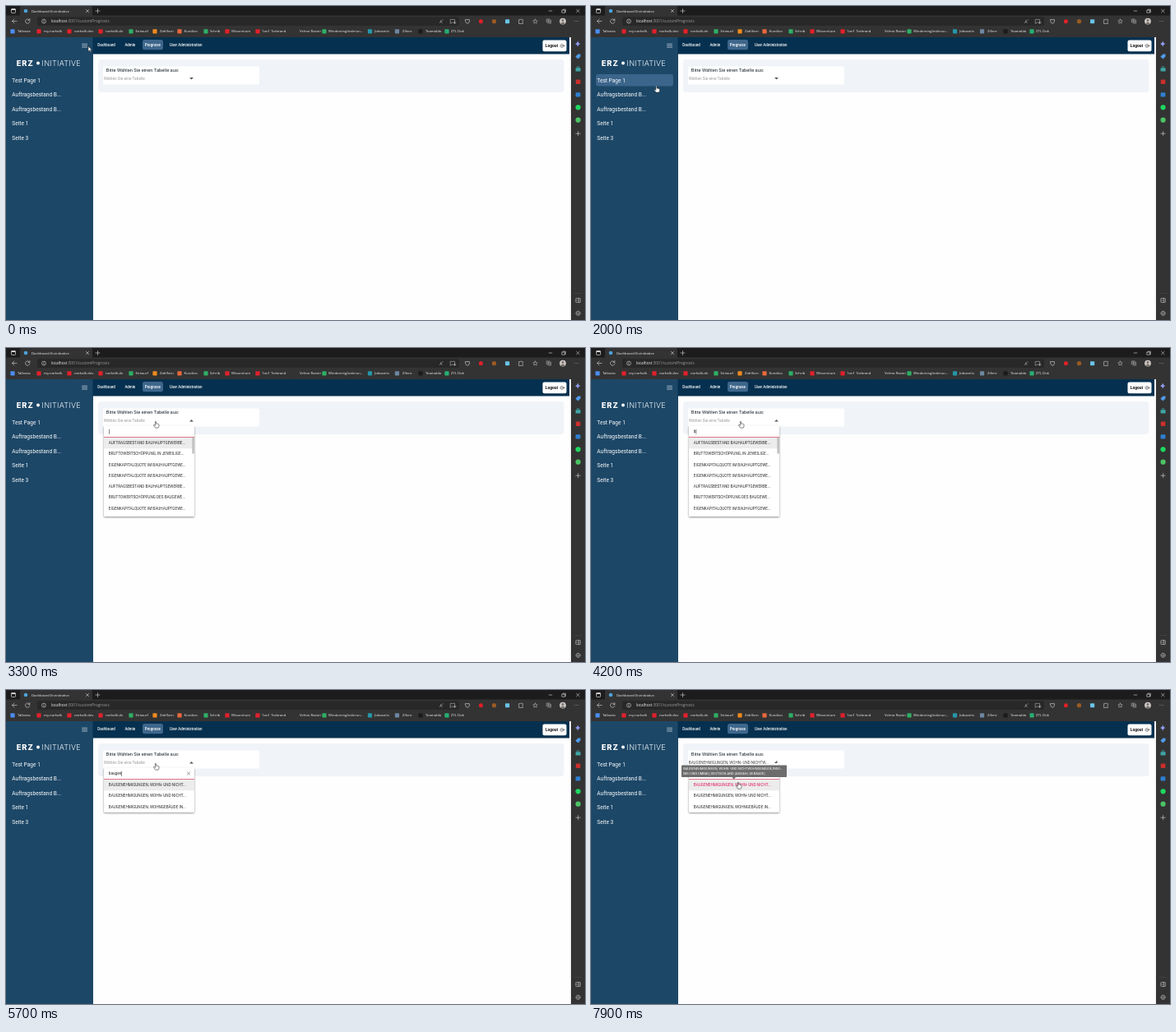
Write an HTML page that moves like this. It is 704 px wide and 382 px high and loops after 8 s.

```html
<!DOCTYPE html>
<html lang="de">
<head>
<meta charset="utf-8">
<title>Dashboard</title>
<style>
html, body { margin: 0; width: 100%; height: 100%; overflow: hidden; background: #fefefe; }
svg { display: block; width: 100vw; height: 100vh; }
text { font-family: Roboto, sans-serif; white-space: pre; }
.ui { font-family: "Open Sans", "Noto Sans", sans-serif; }
.logo { font-family: Inter, sans-serif; }
</style>
</head>
<body>
<svg id="stage" viewBox="0 0 704 382" xmlns="http://www.w3.org/2000/svg"></svg>
<script>
const LOOP = 8000;
const ROW = 13.25;
const PINK = '#e0195f';

const rect = (x, y, w, h, fill, r = 0, more = '') =>
  `<rect x="${x}" y="${y}" width="${w}" height="${h}" rx="${r}" fill="${fill}" ${more}/>`;
const dot = (x, y, r, fill, more = '') => `<circle cx="${x}" cy="${y}" r="${r}" fill="${fill}" ${more}/>`;
const line = (d, color = '#d8d8d8', w = .6) =>
  `<path d="${d}" fill="none" stroke="${color}" stroke-width="${w}" stroke-linecap="round" stroke-linejoin="round"/>`;
const text = (x, y, size, fill, str, more = '') =>
  `<text x="${x}" y="${y}" font-size="${size}" fill="${fill}" ${more}>${str}</text>`;
const ui = (x, y, size, fill, str) => text(x, y, size, fill, str, 'class="ui"');

const bookmarks = [
  [8, 14, '#4a8df0', 'Talkovia'], [40, 46, '#e0202c', 'my.norbelk'],
  [77, 83, '#e0202c', 'norbelk.dev'], [115, 121, '#e0202c', 'norbelk.de'],
  [152, 157.5, '#2fae66', 'Entwurf'], [181, 187, '#ef8a1f', 'Zahlforn'],
  [211, 216.5, '#e8683c', 'Kundivo'], [243, 248, '#2fae66', 'Schrib'],
  [269, 274, '#e0202c', 'Wissentium'], [306, 311, '#e0202c', '1on1 Torbrand'],
  [0, 357, '', 'Velmo Raster'], [387, 392, '#2fae66', 'Wiedereingliederun...'],
  [442.5, 448, '#2596a8', 'Jobvantis'], [475.5, 482, '#6d86a0', 'Zifero'],
  [504, 510, '#1c1c1c', 'Teamaldo'], [536, 541, '#27ae72', 'ZTL Dok']
];

function browser() {
  let s = rect(0, 0, 704, 12, '#1c1c1c') + rect(0, 11.5, 704, 26.5, '#333333') +
    rect(17, 0, 88, 13, '#333333', 2) + rect(38, 13.2, 513, 10.8, '#282828', 2);
  // tab strip
  s += rect(6.5, 3.5, 5, 5, 'none', .8, 'stroke="#ddd" stroke-width=".7"') + rect(6.5, 3.5, 5, 1.6, '#ddd', .5);
  s += dot(24, 6, 2.3, '#4da3dc') + ui(31, 7.6, 4.25, '#f2f2f2', 'Dashboard Erzinitiative');
  s += line('M97.4 4.4l3.2 3.2m0-3.2l-3.2 3.2M109 6h5M111.5 3.5v5');
  s += line('M660.2 6h3.6M693.6 4.2l3.6 3.6m0-3.6l-3.6 3.6M677 5v-.8h3.4v3.4h-.8M676.2 5h3.2v3.2h-3.2z');
  // toolbar
  s += line('M13 18.5H7.5M10 16l-2.5 2.5L10 21') +
    line('M28.6 17.2a2.7 2.7 0 1 0 .3 2M28.9 15.6v1.9h-1.9');
  s += dot(46, 18.6, 2.5, 'none', 'stroke="#d8d8d8" stroke-width=".6"') + line('M46 18.3v1.5M46 17.1v.1');
  s += `<text class="ui" x="54.8" y="20.3" font-size="4.7" fill="#9d9d9d"><tspan fill="#f4f4f4">localhost</tspan>:3001/customPrognosis</text>`;
  s += ui(527.2, 20.5, 5, '#c8c8c8', 'A') + line('M531 16.2q1 .7 0 1.5', '#c8c8c8', .4);
  s += line('M540.6 16.4h5v4.8l-2.5-1.4-2.5 1.4zM544.5 20.2h2.6M545.8 18.9v2.6', '#c8c8c8', .5);
  s += line('M558.8 16.6h4.6v2.4q-.4 1.8-2.3 2.4q-1.9-.6-2.3-2.4z', '#c8c8c8', .7);
  s += rect(575, 16.3, 4.8, 5, '#e02028', 2) + dot(593.5, 18.7, 2.6, '#9a5b22') + rect(607, 16.2, 5.2, 5, '#69c3e6', .6);
  s += line('M624 16.6h1.2q.9-1.4 1.8 0h1.4v1.7q-1.3.9 0 1.8v1.4h-4.4z', '#d0d0d0', .6);
  s += line('M643.5 16l.8 1.7 1.9.2-1.4 1.3.4 1.9-1.7-1-1.7 1 .4-1.9-1.4-1.3 1.9-.2z', '#d0d0d0', .5);
  s += line('M657.6 16h3.6v3.6h-3.6zM659 21h3.6v-3.6M659.4 17v1.6m-.8-.8h1.6', '#d0d0d0', .5);
  s += dot(677, 18.6, 3.9, '#cfc9c6') + dot(677, 17.5, 1.4, '#76706d') + `<path d="M674.3 21.2q2.7-3.6 5.4 0q-2.7 2-5.4 0" fill="#76706d"/>`;
  for (const x of [691.8, 693.8, 695.8]) s += dot(x, 18.6, .45, '#ddd');
  // bookmarks bar
  for (const [ix, tx, color, name] of bookmarks) {
    if (ix) s += rect(ix - 2.6, 28.2, 5.2, 5.2, color, .7);
    s += ui(tx, 32.4, 4.25, '#eeeeee', name);
  }
  return s;
}

function edgeBar() {
  let s = rect(685, 38, 2, 344, '#f6f6f6') + rect(687, 37.5, 17, 344.5, '#333333');
  s += `<path d="M695.2 42.4q.5 2.9 3.2 3.5q-2.7.6-3.2 3.5q-.5-2.9-3.2-3.5q2.7-.6 3.2-3.5" fill="#8f9cf0"/>`;
  s += `<path d="M692.4 61.6l3.2-3h2.9v2.9l-3.1 3.1z" fill="#4f9be8"/>`;
  s += rect(692.6, 75.2, 6, 4.4, '#3fa5a5', .7) + line('M694.4 75v-1.3h2.4v1.3', '#3fa5a5', .7);
  s += rect(692.8, 89.4, 5.6, 5.6, '#c92f2b', 1) + rect(692.6, 105.2, 5.8, 5.4, '#2d7fd0', .8);
  s += dot(695.6, 123.3, 3.1, '#1ed760') + dot(695.6, 138.7, 3.1, '#4cc264');
  s += line('M693 155.2h5.2M695.6 152.6v5.2') + line('M691 349.5h9', '#555', .4);
  s += rect(692.8, 355.6, 5.6, 5, 'none', .7, 'stroke="#d0d0d0" stroke-width=".6"') + line('M696.6 355.8v4.6M694 358h1.4');
  s += dot(695.6, 373.8, 2.5, 'none', 'stroke="#d0d0d0" stroke-width=".9" stroke-dasharray="1.5 .45"') +
    dot(695.6, 373.8, 1, 'none', 'stroke="#d0d0d0" stroke-width=".5"');
  return s;
}

const pages = ['Test Page 1', 'Auftragsbestand B...', 'Auftragsbestand B...', 'Seite 1', 'Seite 3'];
const pageY = i => 90.1 + i * 17.6;

function app() {
  let s = rect(0, 38, 106, 344, '#1d4767') + rect(105.5, 38, 579.5, 20.5, '#05304f');
  s += line('M92.6 46.2h6M92.6 48.2h6M92.6 50.2h6', '#e4edf4', .6);
  s += text(12.8, 72.6, 9.3, '#fff', 'ERZ', 'class="logo" font-weight="800" letter-spacing=".9"');
  s += dot(39, 69.4, 2, '#fff');
  s += text(43.6, 72.6, 9.1, '#eef4f8', 'INITIATIVE', 'class="logo" font-weight="300" letter-spacing=".25"');
  s += rect(6, 83, 94, 14.6, '#3c658b', 3, 'id="hover"');
  pages.forEach((p, i) => s += text(7.3, pageY(i) + 2.4, 6.6, '#f7fafc', p));
  s += rect(166, 41, 25, 12.2, '#3f678c', 2.5);
  [[111.3, 'Dashboard'], [144.4, 'Admin'], [168.8, 'Prognose'], [199, 'User Administration']]
    .forEach(([x, name]) => s += text(x, 48.5, 4.45, '#fff', name, 'font-weight="500"'));
  s += rect(652.5, 41.6, 29, 13.6, '#fff', 2) + text(655.8, 50.2, 4.9, '#111', 'Logout', 'font-weight="700"');
  s += line('M677 46.7a2 2 0 1 0 0 3.5M675.8 48.4h3M677.8 47.4l1 1-1 1', '#222', .6);
  s += rect(112, 65, 566.5, 40, '#f0f3f8', 4) + rect(118, 73.5, 190, 22, '#ffffff', 2);
  s += text(121.8, 80.1, 5.75, '#15202b', 'Bitte Wählen Sie einen Tabelle aus:');
  s += text(118.8, 89.7, 4.8, '#9c9c9c', '', 'id="value"');
  s += `<path id="arrow" d="M-2.4-1.2H2.4L0 1.3z" fill="#555"/>`;
  return s;
}

const long = '...';
const order = 'AUFTRAGSBESTAND BAUHAUPTGEWERBE' + long;
const equity = 'EIGENKAPITALQUOTE IM BAUHAUPTGEWE' + long;
const value = 'BRUTTOWERTSCHÖPFUNG';
const permit = 'BAUGENEHMIGUNGEN, WOHN';
const permits = [permit + '- UND NICHT' + long, permit + '- UND NICHT' + long, permit + 'GEBÄUDE IN' + long];
const sector = value + ' DES BAUGEWE' + long;
const allRows = [order, value + ', IN JEWEILIGE' + long, equity, equity, order, sector, equity];
const rowsFor = q => q === 'baugen' ? permits : q.length > 3 ? [sector, ...permits, sector] : allRows;

function dropdown() {
  return `<g id="panel">` +
    rect(119, 94.5, 110, 110, '#fff', 1.5, 'id="sheet" filter="url(#shade)"') +
    rect(119, 109, 110, ROW, '#ececec') +
    text(124.8, 102.9, 4.7, '#222', '', 'id="query"') +
    rect(125, 98.8, .5, 6, '#111', 0, 'id="caret"') +
    `<g id="clear">${line('M220.3 99.7l3.6 3.6m0-3.6l-3.6 3.6', '#666', .6)}</g>` +
    rect(119, 108.2, 110, .8, '#d9536f') +
    `<g id="rows"></g>` + rect(226.4, 109, 2.4, 19.5, '#bdbdbd', 0, 'id="thumb"') + `</g>`;
}

const tooltip = () => `<g id="tip"><path d="M111 91.6H237a1 1 0 0 1 1 1V105a1 1 0 0 1-1 1H176l-2.3 2.4L171.4 106H111a1 1 0 0 1-1-1V92.600a1 1 0 0 1 1-1z" fill="#6c6c6c"/>` +
  text(112.2, 97, 4.03, '#fff', permit + '- UND NICHTWOHNGEBÄUDE,INSG...') +
  text(112.2, 102.7, 4.03, '#fff', 'NEU UND UMBAU, DEUTSCHLAND (ANZAHL GEBÄUDE)') + `</g>`;

const cursors = () => `<g id="cursor" stroke="#222" stroke-width=".55" fill="#fff" stroke-linejoin="round">
  <path id="pointer" d="M0 0V6.200L1.500 4.900L2.500 7L3.500 6.500L2.600 4.500H4.500z"/>
  <path id="hand" d="M-.6.600Q0-.4.600.600V3.200Q1.300 2.600 1.800 3.400Q2.500 2.900 3 3.700Q3.900 3.400 4 4.400V6Q3.700 7.400 3.200 8.100H-.4Q-1.300 6.800-2.500 5.300Q-2.600 4.200-1.500 4.600L-.6 5.400z"/></g>`;

const stage = document.getElementById('stage');
stage.innerHTML = `<defs><filter id="shade" x="-10%" y="-10%" width="120%" height="125%">
  <feDropShadow dx="0" dy="1" stdDeviation="1.3" flood-color="#000" flood-opacity=".45"/></filter></defs>` +
  rect(0, 0, 704, 382, '#fefefe') + app() + browser() + edgeBar() + dropdown() + tooltip() + cursors();

const el = {};
stage.querySelectorAll('[id]').forEach(n => el[n.id] = n);
const set = (id, attrs) => { for (const k in attrs) el[id].setAttribute(k, attrs[k]); };
const show = (id, on) => set(id, { visibility: on ? 'visible' : 'hidden' });

// [time, x, y]
const track = [
  [0, 100, 49], [1200, 100, 49], [1300, 105, 49.5], [1500, 106, 49.5], [1600, 105, 51],
  [1800, 95, 72], [1900, 86, 88], [2000, 79.5, 97], [2100, 76, 107], [2200, 77, 116],
  [2300, 84, 122], [2400, 97, 121], [2500, 118, 116], [2700, 174.5, 96.5], [2800, 180, 92],
  [3000, 182, 89], [6800, 182, 89], [7000, 181, 103], [7200, 179, 112], [8000, 179, 112]
];
function place(t) {
  const i = track.findIndex((k, n) => n && t <= k[0]);
  const [a, b] = [track[i - 1], track[i]];
  const f = (t - a[0]) / (b[0] - a[0]);
  return [a[1] + (b[1] - a[1]) * f, a[2] + (b[2] - a[2]) * f];
}

const typed = [[3300, ''], [4200, 'b'], [4300, 'ba'], [4400, 'bau'], [4900, 'baug'], [5100, 'bauge'], [5700, 'baugen']];

let drawn = -1;
function update(ms) {
  const t = Math.floor(ms % LOOP / 100) * 100;
  if (t === drawn) return;
  drawn = t;

  const [x, y] = place(t);
  const page = x < 100 ? pages.findIndex((p, i) => Math.abs(y - pageY(i)) < 7.3) : -1;
  show('hover', page >= 0);
  if (page >= 0) set('hover', { y: pageY(page) - 7.2 });
  const hand = page >= 0 || t >= 2800;
  show('hand', hand);
  show('pointer', !hand);
  set('cursor', { transform: `translate(${x} ${y})` });

  const open = t >= 3200, picked = t >= 7900;
  set('arrow', { transform: `translate(225.5 88.200) rotate(${picked ? -45 : open ? 180 : 0})` });
  el.value.textContent = picked ? permit + '- UND NICHTW' + long : 'Wählen Sie eine Tabelle';
  set('value', { fill: picked ? '#444' : '#9c9c9c', 'font-size': picked ? 4.6 : 4.8 });

  const [since, query] = typed.filter(k => k[0] <= t).pop() || [0, ''];
  const rows = rowsFor(query);
  const full = rows.length === 7;
  set('panel', {
    opacity: !open ? 0 : t < 3300 ? .45 : 1,
    transform: t < 3300 ? 'translate(0 9.450) scale(1 .9)' : ''
  });
  set('sheet', { height: full ? 110.5 : 14.5 + rows.length * ROW });
  show('thumb', full);
  show('clear', query.length > 1);
  el.query.textContent = query;
  set('caret', { x: 125 + (query ? el.query.getComputedTextLength() : 0) });
  show('caret', open && (t - since) % 1000 < 500);
  el.rows.innerHTML = rows.map((r, i) =>
    text(124.8, 117.2 + i * ROW, 4.68, picked && !i ? PINK : '#2c2c2c', r)).join('');

  set('tip', { opacity: Math.max(0, Math.min(1, [0, .65, .88, 1][Math.min(3, (t - 7100) / 100)] || 0)) });
}

const start = performance.now();
function tick() {
  update(performance.now() - start);
  requestAnimationFrame(tick);
}
update(0);
tick();
</script>
</body>
</html>
```
